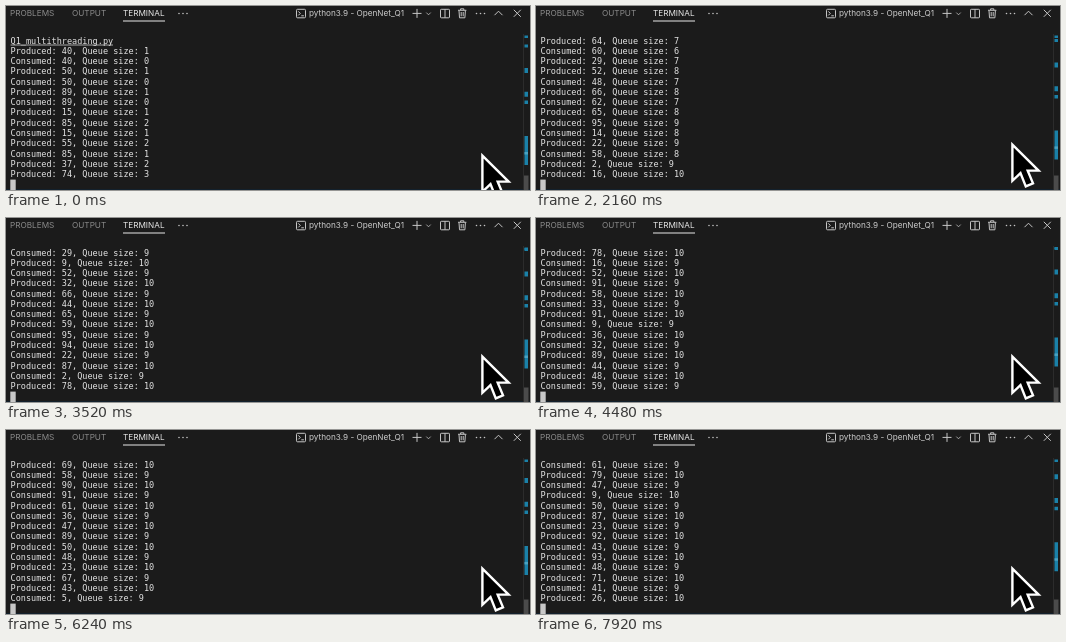
Write an HTML page that moves like this. It is 524 by 184 pixels and loops after 8000 ms.

```html
<!DOCTYPE html>
<html lang="en">
<head>
<meta charset="utf-8">
<title>Terminal output</title>
<style>
html, body { margin: 0; width: 100%; height: 100%; overflow: hidden; background: #1b1b1b; }
svg { display: block; width: 524px; height: 184px; }
.ui { font: 8.2px Inter, "Open Sans", sans-serif; fill: #8b8b8b; }
.ui .on { fill: #e7e7e7; }
.out { font: 8.52px "DejaVu Sans Mono", monospace; fill: #e4e4e4; white-space: pre; }
.icon { fill: none; stroke: #c5c5c5; stroke-width: 1; }
.dots { fill: none; stroke: #c5c5c5; stroke-width: 1.6; stroke-linecap: round; stroke-dasharray: 0 4; }
</style>
</head>
<body>
<svg viewBox="0 0 524 184">
  <defs><clipPath id="pane"><rect x="517" y="29" width="7" height="155"/></clipPath></defs>
  <rect width="524" height="184" fill="#1b1b1b"/>
  <rect y="183" width="524" height="1" fill="#13212d"/>
  <g class="ui">
    <text x="4" y="10.3">PROBLEMS</text>
    <text x="66" y="10.3">OUTPUT</text>
    <text x="117" y="10.3" class="on">TERMINAL</text>
    <text x="303" y="10.3" style="fill:#cccccc">python3.9 - OpenNet_Q1</text>
  </g>
  <path d="M117 15H159" stroke="#e7e7e7"/>
  <g class="icon">
    <rect x="290.5" y="3.3" width="9" height="8.5" rx="1"/>
    <path d="M292.3 5.4l2 2-2 2M295.3 9.8h2.6"/>
    <path d="M406.5 7.4h9M411 2.9v9"/>
    <path d="M420.3 6.6l2.2 2.2 2.2-2.2" stroke-width=".8"/>
    <rect x="434.5" y="3.3" width="9" height="8.5" rx=".8"/>
    <path d="M439 3.3v8.5"/>
    <path d="M452 4.3h8.4M454.6 4.1V2.8h3.2v1.3M453 4.6l.5 7.2h5.4l.5-7.2M455.2 6v4.3M457.2 6v4.3"/>
    <path d="M488.5 9.2l4-4 4 4M507.8 3.8l7 7m0-7l-7 7"/>
  </g>
  <path class="dots" d="M173 7.5h8.1M470.5 7.5h8.1"/>
  <g id="lines" class="out"></g>
  <path id="underline" d="M4.6 39H107" stroke="#e4e4e4" stroke-width=".7"/>
  <rect x="4.3" y="173.6" width="5.4" height="10.4" fill="#c8c8c8"/>
  <path d="M517.5 28V184" stroke="#2c2c2c"/>
  <rect x="518" y="169.5" width="4.5" height="14.5" fill="#4b4b4b"/>
  <g clip-path="url(#pane)" fill="#1b81a8">
    <rect x="518.5" y="29.5" width="3.5" height="2.5"/>
    <g id="marks">
      <path d="M518.5 38.5h3.5v3h-3.5zm0 23.5h3.5v5h-3.5zm0 23.8h3.5v5h-3.5zm0 8.7h3.5v3.5h-3.5zm0 35.5h3.5v29h-3.5z"/>
      <rect x="518.5" y="146" width="3.5" height="2.5" fill="#4ba3c2"/>
    </g>
  </g>
  <path id="mouse" d="M1.2 2.8V39L9.3 31.3 14.6 44.6 21.8 41.6 16.5 28.8H27.4Z" stroke="#fff" stroke-width="2.4"/>
</svg>
<script>
const TICK = 80, TICKS = 100, ROWS = 14;
const NS = "http://www.w3.org/2000/svg";
const $ = id => document.getElementById(id);

// The items printed on screen, in the order they are queued
const items = `40 50 89 15 85 55 37 74 39 54 8 72 66 29 60 48 62 14
  58 31 64 29 52 66 65 95 22 2 16 91 33 9 32 44 59 94 87 78 52 58 91 36
  89 48 67 5 27 83 69 90 61 47 50 23 43 48 41 12 76 35 79 9 87 92 93 71 26`.split(/\s+/);

// P = produce, C = consume; once the queue is full the two alternate
const ops = "PCPCPCPPCPCPPCPCPPCPCPPCPCPPCPCPCPPCPPCPCPPCPCPP" + "CP".repeat(38);

function runQueue() {
  const log = ["Q1_multithreading.py"];
  let made = 0, used = 0;
  for (const op of ops) {
    const text = op === "P" ? "Produced: " + items[made++] : "Consumed: " + items[used++];
    log.push(`${text}, Queue size: ${made - used}`);
  }
  return log;
}
const log = runQueue();

// Lines printed by a tick: fast while the queue fills, then slower
const pace = [[0, 0], [27, 35], [56, 66], [78, 88], [99, 111]];
function scrolled(tick) {
  const i = pace.findIndex(([t]) => t >= tick) || 1;
  const [t0, n0] = pace[i - 1], [t1, n1] = pace[i];
  return Math.round(n0 + (n1 - n0) * (tick - t0) / (t1 - t0));
}

const rows = Array.from({ length: ROWS }, (_, i) => {
  const row = document.createElementNS(NS, "text");
  row.setAttribute("x", 4.6);
  row.setAttribute("y", 37.5 + i * 10.28);
  return $("lines").appendChild(row);
});

const move = (id, x, y) => $(id).setAttribute("transform", `translate(${x} ${y.toFixed(2)})`);

function draw(ms) {
  const tick = Math.floor(ms / TICK) % TICKS;
  const n = scrolled(tick);
  rows.forEach((row, i) => { row.textContent = log[n + i]; });
  $("underline").setAttribute("visibility", n ? "hidden" : "visible");
  move("marks", 0, -n * 0.16);
  const p = Math.min(1, tick / 6);
  move("mouse", 475.2, 146.8 - 11 * p * p * (3 - 2 * p));
}

const start = performance.now();
function loop() {
  draw((performance.now() - start) % (TICK * TICKS));
  requestAnimationFrame(loop);
}
loop();
</script>
</body>
</html>
```
